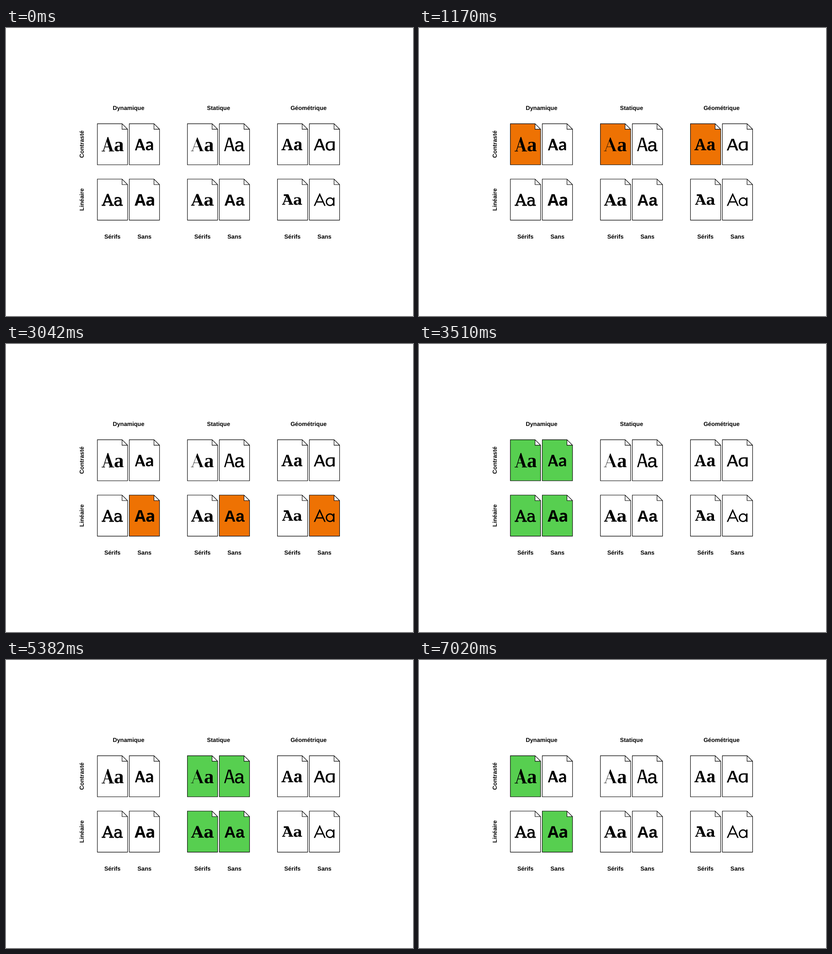
Recreate the animation shown at these times as an HTML page. Size 890x629 px, loop 8000 ms.

```html
<!DOCTYPE html>
<html lang="fr">
<head>
<meta charset="utf-8">
<title>Familles de caractères</title>
<style>
  html, body { margin: 0; width: 100%; height: 100%; overflow: hidden; background: #fff; }
  svg { display: block; width: 890px; height: 629px; }
  text { text-rendering: geometricPrecision; }
  .label { font: bold 12.8px "Liberation Sans", Arial, sans-serif; text-anchor: middle; }
  .page { fill: #fff; stroke: #000; stroke-width: 1.1; }
</style>
</head>
<body>
<svg id="stage" viewBox="0 0 890 629"></svg>
<script>
const STEP = 1170, LOOP = 8000;
const ORANGE = '#ee7203', GREEN = '#57cf50';
const SANS = '"Liberation Sans", Arial, sans-serif';
const SERIF = '"Liberation Serif", Times, serif';
const SLAB = '"DejaVu Serif", serif';

const stage = document.getElementById('stage');

function add(tag, attrs, content) {
  const el = document.createElementNS('http://www.w3.org/2000/svg', tag);
  for (const key in attrs) el.setAttribute(key, attrs[key]);
  if (content) el.textContent = content;
  stage.append(el);
  return el;
}

const label = (content, x, y, turn = 0) =>
  add('text', { class: 'label', transform: `translate(${x} ${y}) rotate(${turn})` }, content);

function glyphs(content, x, y, size, family, weight = 400, outline = 0) {
  add('text', {
    x, y, 'font-size': size, 'font-family': family, 'font-weight': weight,
    stroke: '#000', 'stroke-width': outline
  }, content);
}

// Capital A: foot edges, apex, leg widths, crossbar and optional feet
function capA({ left, right, apex, cut, top, base, thin, thick, bar, barH, foot = 0, footH = 0 }) {
  const t = (right - thick - left - thin) / (right - left - 2 * cut);
  const innerX = left + thin + (apex - cut - left) * t;
  const innerY = base - (base - top) * t;
  const up = (base - bar) / (base - top);
  const barL = left + thin / 2 + (apex - cut - left) * up;
  const barR = right - thick / 2 + (apex + cut - right) * up;
  let d = `M${left} ${base}L${apex - cut} ${top}H${apex + cut}L${right} ${base}` +
    `H${right - thick}L${innerX} ${innerY}L${left + thin} ${base}Z`;
  d += `M${barL} ${bar}H${barR}v${barH}H${barL}Z`;
  if (foot) {
    for (const [mid, half] of [[left + thin / 2, foot], [right - thick / 2, foot + thick / 3]]) {
      d += `M${mid - half} ${base - footH}h${2 * half}v${footH}h${-2 * half}Z`;
    }
  }
  add('path', { d });
}

['Dynamique', 'Statique', 'Géométrique'].forEach((name, col) => {
  const x = 268 + col * 196.8;
  label(name, x, 178.5);
  label('Sérifs', x - 35.3, 459.5);
  label('Sans', x + 34.8, 459.5);
});
label('Contrasté', 169.6, 253.8, -90);
label('Linéaire', 169.6, 374.6, -90);

const pages = [];
for (let col = 0; col < 3; col++)
  for (let row = 0; row < 2; row++)
    for (let sans = 0; sans < 2; sans++) {
      const x = 199.8 + col * 196.9 + sans * 69.8, y = 209.1 + row * 120.9;
      const el = add('path', {
        class: 'page',
        d: `M${x} ${y}h54l12.1 12v77.6h-66.1ZM${x + 54} ${y}v12h12.1`
      });
      pages.push({ el, col, row, sans });
    }

// Contrasted row
capA({ left: 212, right: 234, apex: 222.8, cut: .8, top: 238, base: 269.4,
       thin: 1.6, thick: 6.5, bar: 259, barH: 1.4, foot: 3.6, footH: 1.3 });
glyphs('a', 236, 269.3, 43.5, SERIF, 700);
capA({ left: 282, right: 304.5, apex: 292.7, cut: 2.4, top: 242, base: 267.3,
       thin: 3.6, thick: 5.6, bar: 258.4, barH: 2.8 });
glyphs('a', 304.8, 267.3, 37, 'Lato, sans-serif', 700);
capA({ left: 407, right: 430.8, apex: 418.4, cut: .4, top: 239, base: 269,
       thin: .8, thick: 6, bar: 259.3, barH: .8, foot: 3, footH: .8 });
glyphs('a', 433, 269, 43, SERIF, 700);
capA({ left: 477, right: 500, apex: 488.5, cut: 2.9, top: 239.5, base: 269,
       thin: 3, thick: 4.4, bar: 257.8, barH: 2.4 });
glyphs('a', 499.3, 269, 40, SANS, 400, .4);
glyphs('Aa', 602, 267, 35, '"Noto Serif", serif', 700);
capA({ left: 673, right: 698, apex: 686, cut: 2.6, top: 242, base: 267.5,
       thin: 3.6, thick: 4.6, bar: 257.6, barH: 2.8 });
add('path', {
  'fill-rule': 'evenodd',
  d: 'M718.7 247.5V267.5H714.4V265.2Q712 268 708.2 268C702 268 699 263.8 699 257.6S702.4 247.5 709.4 247.5Z' +
     'M714.4 250.2H709.6C705 250.2 703 253 703 257.6S704.8 265 708.6 265Q712.6 265 714.4 261.5Z'
});

// Linear row
glyphs('Aa', 210, 387.5, 34.8, SLAB, 400, 1);
glyphs('Aa', 281.2, 387.8, 35, '"Open Sans", sans-serif', 700);
glyphs('Aa', 405, 387.8, 35, SLAB, 700);
glyphs('Aa', 477, 387.8, 35, SANS, 700);
glyphs('Aa', 604, 385.6, 31, SLAB, 700);
add('path', { d: 'M607.5 363.2h9v3.6h-9Z' });
capA({ left: 673, right: 699, apex: 686, cut: .5, top: 361, base: 388.5,
       thin: 3, thick: 3, bar: 378.6, barH: 2.6 });
add('path', {
  fill: 'none', stroke: '#000', 'stroke-width': 2.8,
  d: 'M716.9 370.2V388.5M716.6 379.4a8 8.3 0 1 1 -16 0a8 8.3 0 1 1 16 0'
});

const steps = [
  () => null,
  p => !p.row && !p.sans && ORANGE,
  p => p.row && p.sans && ORANGE,
  p => p.col === 0 && GREEN,
  p => p.col === 1 && GREEN,
  p => p.col === 2 && GREEN,
  p => p.col === 0 && p.row === p.sans && GREEN
];

let shown = -1;
function draw() {
  const now = Math.floor(performance.now() % LOOP / STEP);
  if (now !== shown) {
    shown = now;
    for (const p of pages) p.el.style.fill = steps[now](p) || '#fff';
  }
  requestAnimationFrame(draw);
}
draw();
</script>
</body>
</html>
```
